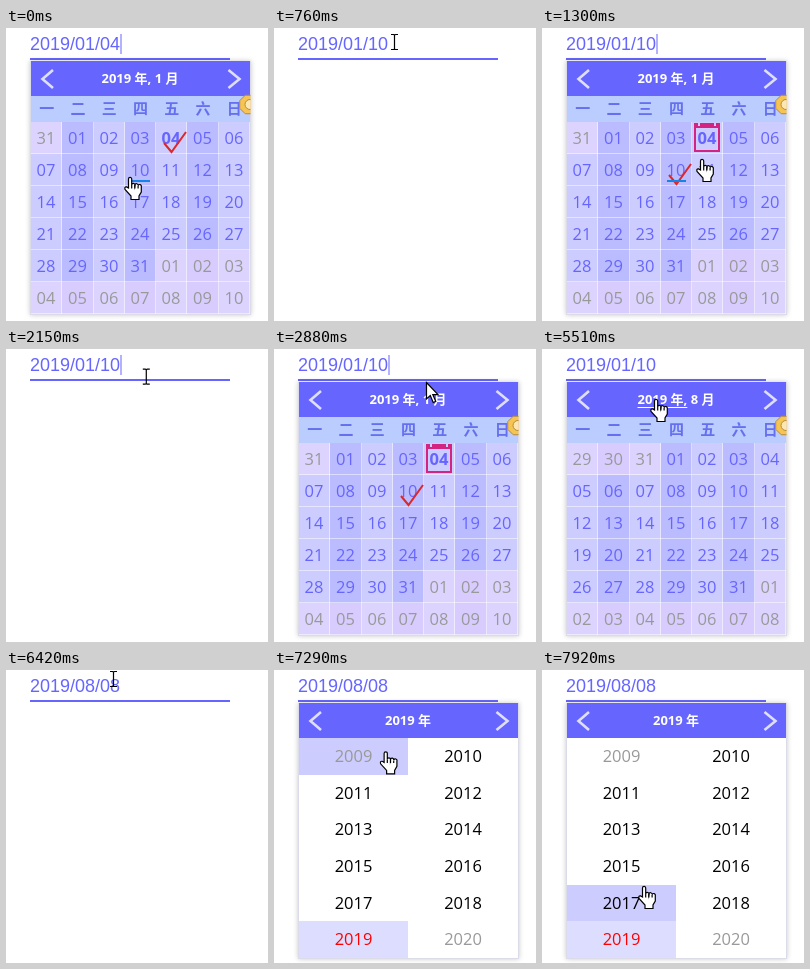
An HTML page with a canvas for the animation above (8 s loop, 262 by 293 pixels).

```html
<!DOCTYPE html>
<html lang="zh">
<head>
<meta charset="utf-8">
<title>Date picker</title>
<style>
html, body { margin: 0; width: 100%; height: 100%; overflow: hidden; background: #fff; }
canvas { display: block; width: 262px; height: 293px; }
</style>
</head>
<body>
<canvas id="stage"></canvas>
<script>
const W = 262, H = 293, LOOP = 8000;
const canvas = document.getElementById('stage');
const ratio = window.devicePixelRatio || 1;
canvas.width = W * ratio;
canvas.height = H * ratio;
const ctx = canvas.getContext('2d');

const MAIN = '#6666ff';
const CJK = '"Open Sans", "Noto Sans CJK SC", "Noto Sans CJK JP", "Noto Sans CJK", sans-serif';
const INPUT_FONT = '18px "Liberation Sans", Arial, sans-serif';
const CELL_FONT = '16.5px ' + CJK;
const HEAD_FONT = 'bold 13px ' + CJK;
const LEFT = 25, TOP = 68, INNER = 219, MID = 134;

// time, view, month, selected day of that month
const states = [
  [0, 'days', 0, 4],
  [120, 'closed', 0, 10],
  [950, 'days', 0, 10],
  [1740, 'closed', 0, 10],
  [2580, 'days', 0, 10],
  [3330, 'months', 0, 10],
  [4700, 'days', 7, 0],
  [6060, 'closed', 7, 8],
  [6700, 'days', 7, 8],
  [7140, 'years', 7, 8]
];

// time, x, y of the pointer's hot spot
const path = [
  [0, 124, 149], [120, 124, 149], [410, 126, 90], [700, 120, 14],
  [950, 120, 14], [1120, 126, 140], [1290, 128, 146], [1300, 160, 131],
  [1450, 160, 131], [1600, 140, 140], [1740, 138, 142], [2200, 140, 14],
  [2580, 140, 10], [2860, 152, 33], [3030, 152, 33], [3200, 160, 48],
  [3330, 160, 48], [3600, 172, 112], [4140, 186, 199], [4800, 186, 199],
  [5300, 114, 50], [5629, 114, 50], [5630, 125, 121], [5779, 125, 121],
  [5780, 131, 131], [6060, 131, 131], [6400, 107, 9], [6700, 107, 9],
  [6990, 114, 48], [7140, 114, 48], [7900, 102, 216], [8000, 102, 216]
];

const HAND = new Path2D('M4.5 11V2a1.6 1.6 0 0 1 3.2 0V8a1.6 1.6 0 0 1 3.2 0a1.6 1.6 0 0 1 3.2 .7a1.6 1.6 0 0 1 3.2 1V15L15 19V22.5H7V19L1 12.4Q.2 9.6 2.6 9.9Z');
const FINGERS = new Path2D('M7.7 8V11.5M10.9 8V11.5M14.1 9V11.5');
const ARROW = new Path2D('M.5 .5V17L4.3 13.5 7.2 20.5 9.8 19.4 6.8 12.6H12Z');
const BEAM = new Path2D('M-3.5 -7.5H-1Q0 -7.5 0 -6.5Q0 -7.5 1 -7.5H3.5M0 -6.5V6.5M-3.5 7.5H-1Q0 7.5 0 6.5Q0 7.5 1 7.5H3.5');

function pointer(t) {
  if (t <= 0) return { x: path[0][1], y: path[0][2] };
  const i = path.findIndex(k => k[0] > t);
  const [t0, x0, y0] = path[i - 1], [t1, x1, y1] = path[i];
  const p = (t - t0) / (t1 - t0);
  return { x: x0 + (x1 - x0) * p, y: y0 + (y1 - y0) * p };
}

function box(x, y, w, h, color) {
  ctx.fillStyle = color;
  ctx.fillRect(x, y, w, h);
}

function label(str, x, y, font, color, align = 'center') {
  ctx.font = font;
  ctx.textAlign = align;
  ctx.fillStyle = color;
  ctx.fillText(str, x, y);
}

function line(points, color, width) {
  ctx.beginPath();
  points.forEach(([x, y]) => ctx.lineTo(x, y));
  ctx.strokeStyle = color;
  ctx.lineWidth = width;
  ctx.stroke();
}

const pad = n => String(n).padStart(2, '0');
const colX = c => Math.round(LEFT + c * INNER / 7);

function drawInput(t, month, day) {
  const text = month ? '2019/08/08' : '2019/01/' + pad(day);
  label(day ? text : '2019/01/10', 24, 22, INPUT_FONT, MAIN, 'left');
  box(24, 30, 200, 2, MAIN);
  const focus = t < 950 ? 0 : t < 2580 ? 950 : 2580;
  if (t < 3330 && (t - focus) % 1060 < 530) box(114.5, 6, 1, 20, MAIN);
}

function drawFrame(bottom) {
  ctx.save();
  ctx.shadowColor = 'rgba(0,0,0,.22)';
  ctx.shadowBlur = 5 * ratio;
  box(24, 33, 221, bottom - 33, '#fff');
  ctx.restore();
  ctx.strokeStyle = '#dcdce8';
  ctx.lineWidth = 1;
  ctx.strokeRect(24.5, 33.5, 220, bottom - 34);
  box(LEFT, 33, INNER, 35, MAIN);
}

function drawArrows() {
  line([[47, 42], [36.5, 51], [47, 60]], '#dedeff', 2.6);
  line([[222.5, 42], [233.5, 51], [222.5, 60]], '#dedeff', 2.6);
}

function drawTitle(month, pos) {
  const year = '2019 年,', rest = ' ' + (month + 1) + ' 月';
  ctx.font = HEAD_FONT;
  const wy = ctx.measureText(year).width, wr = ctx.measureText(rest).width;
  const x = MID - (wy + wr) / 2;
  label(year + rest, x, 55, HEAD_FONT, '#fff', 'left');
  if (pos.y > 43 && pos.y < 60 && pos.x > x && pos.x < x + wy + wr) {
    if (pos.x < x + wy) box(x, 58, wy, 1, '#fff');
    else box(x + wy + 3, 58, wr - 3, 1, '#fff');
  }
}

function drawBadge() {
  ctx.save();
  ctx.beginPath();
  ctx.rect(230, 64, 14.5, 26);
  ctx.clip();
  ctx.beginPath();
  for (let i = 0; i < 8; i++) {
    const a = (i + .5) * Math.PI / 4;
    ctx.lineTo(243 + 10 * Math.cos(a), 76.5 + 10 * Math.sin(a));
  }
  ctx.closePath();
  ctx.fillStyle = '#f6c453';
  ctx.fill();
  ctx.strokeStyle = '#b58a3c';
  ctx.lineWidth = 1;
  ctx.stroke();
  ctx.beginPath();
  ctx.arc(244, 76.5, 5, 0, 7);
  ctx.fillStyle = '#fbe6b4';
  ctx.fill();
  ctx.stroke();
  ctx.restore();
}

function drawToday(x, y, bg) {
  const pink = '#d42482';
  ctx.strokeStyle = pink;
  ctx.lineWidth = 2;
  ctx.strokeRect(x + 3, y + 4, 24, 25);
  box(x + 2, y + 1, 26, 5, pink);
  box(x + 6, y, 2, 4, bg);
  box(x + 22, y, 2, 4, bg);
}

function drawDays(month, selected, pos, trail) {
  drawFrame(287);
  drawArrows();
  drawTitle(month, pos);
  box(LEFT, TOP, INNER, 26, '#bbccff');
  [...'一二三四五六日'].forEach((d, c) =>
    label(d, LEFT + (c + .5) * INNER / 7, 86, 'bold 15px ' + CJK, '#6670ee'));

  const offset = (new Date(2019, month, 1).getDay() + 6) % 7;
  for (let i = 0; i < 42; i++) {
    const c = i % 7, x = colX(c), y = 94 + 32 * Math.floor(i / 7), w = colX(c + 1) - x;
    const date = new Date(2019, month, 1 - offset + i);
    const inside = date.getMonth() === month, day = date.getDate();
    const bg = inside ? (c % 2 ? '#bbbbff' : '#ccccff') : (c % 2 ? '#d8ccff' : '#dcd4ff');
    box(x, y, w, 32, bg);
    box(x + w - 1, y, 1, 32, 'rgba(255,255,255,.5)');
    box(x, y + 31, w, 1, 'rgba(255,255,255,.5)');
    const today = inside && month === 0 && day === 4;
    const chosen = inside && day === selected;
    if (today && !chosen) drawToday(x, y, bg);
    label(pad(day), x + w / 2 - .5, y + 22, (today ? 'bold ' : '') + CELL_FONT, inside ? MAIN : '#999');
    if (chosen) line([[x + 8, y + 21], [x + 15.5, y + 30], [x + 30, y + 10]], '#dc2828', 2);
    if (trail.x >= x && trail.x < x + w && trail.y >= y && trail.y < y + 32)
      box(x + 6, y + 26, 19, 2, '#1484e8');
  }
  drawBadge();
}

function drawPanel(title, items, active, muted, hoverColor, pos) {
  drawFrame(289);
  label(title, MID, 55, HEAD_FONT, '#fff');
  const rowH = 220 / 6;
  items.forEach((text, i) => {
    const right = i % 2, row = Math.floor(i / 2);
    const x = right ? MID : LEFT, w = right ? 110 : 109;
    const y = Math.round(TOP + row * rowH), h = Math.round(TOP + (row + 1) * rowH) - y;
    const hover = pos.x >= x && pos.x < x + w && pos.y >= y && pos.y < y + h;
    if (hover) box(x, y, w, h, hoverColor);
    else if (i === active) box(x, y, w, h, '#ddddff');
    const color = i === active ? '#ff0000' : muted.includes(i) ? '#999' : '#000';
    label(text, x + w / 2, y + 24, CELL_FONT, color);
  });
}

function drawPointer(pos, view) {
  const { x, y } = pos;
  const onTitle = y > 43 && y < 60 && x > 95 && x < 173;
  const onCell = y >= (view === 'days' ? 94 : TOP) && y < 288;
  ctx.save();
  ctx.strokeStyle = '#000';
  ctx.fillStyle = '#fff';
  ctx.lineWidth = 1.2;
  if (y < 31) {
    ctx.translate(x + .5, y);
    ctx.stroke(BEAM);
  } else if (view !== 'closed' && (onTitle || onCell)) {
    ctx.translate(x - 6, y);
    ctx.fill(HAND);
    ctx.stroke(HAND);
    ctx.stroke(FINGERS);
  } else {
    ctx.translate(x, y);
    ctx.fill(ARROW);
    ctx.stroke(ARROW);
  }
  ctx.restore();
}

const months = Array.from({ length: 12 }, (_, i) => i + 1 + ' 月');
const years = Array.from({ length: 12 }, (_, i) => String(2009 + i));

function draw(t) {
  const [, view, month, day] = states.filter(s => s[0] <= t).pop();
  const pos = pointer(t);
  ctx.setTransform(ratio, 0, 0, ratio, 0, 0);
  box(0, 0, W, H, '#fff');
  drawInput(t, month, day);
  if (view === 'days') drawDays(month, day, pos, pointer(t - 150));
  if (view === 'months') drawPanel('1 月', months, 0, [], '#bbbbff', pos);
  if (view === 'years') {
    drawPanel('2019 年', years, 10, [0, 11], '#ccccff', pos);
    drawArrows();
  }
  drawPointer(pos, view);
}

const start = performance.now();
function tick() {
  draw((performance.now() - start) % LOOP);
  requestAnimationFrame(tick);
}
tick();
</script>
</body>
</html>
```
